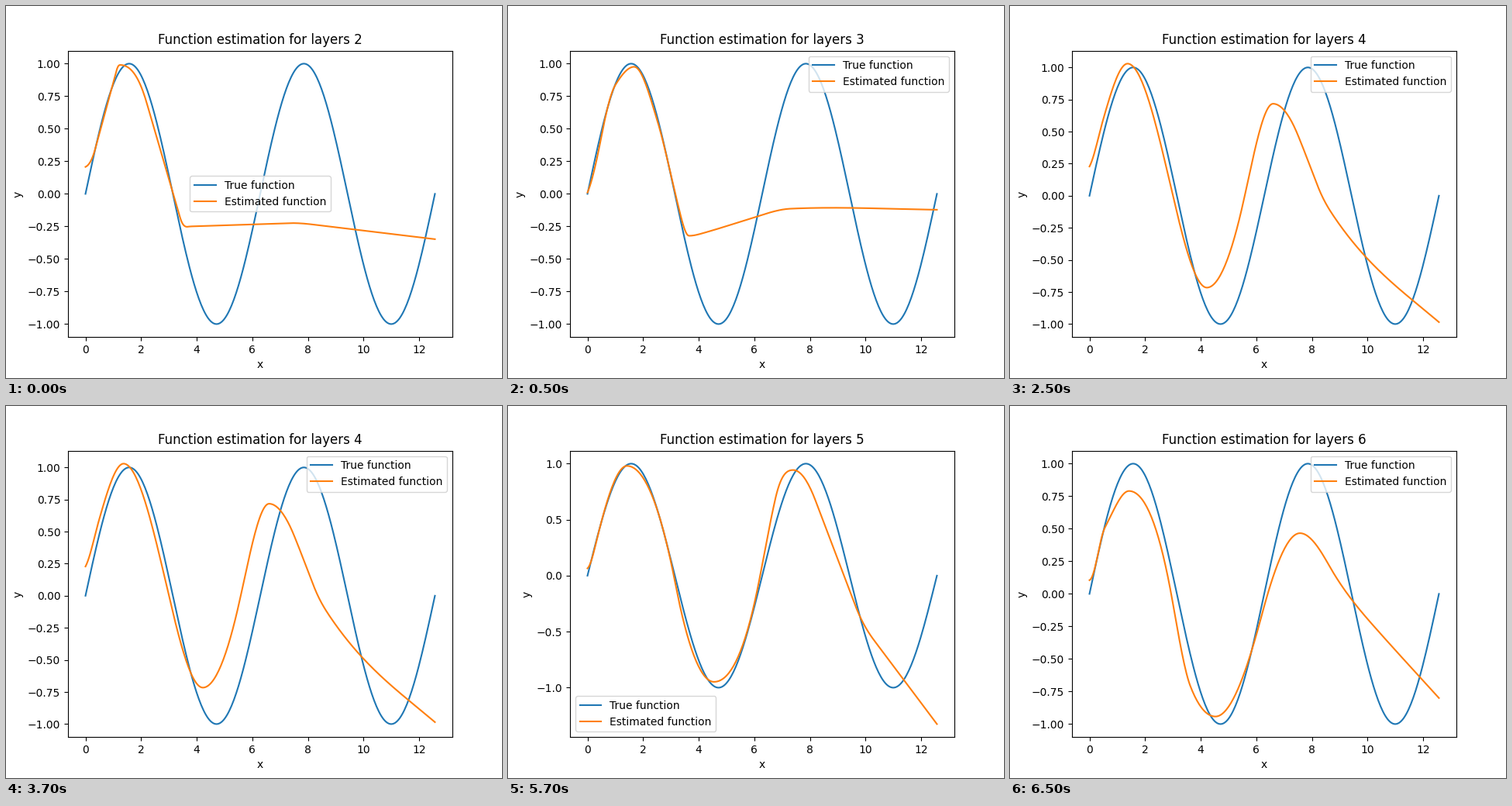
A matplotlib script that plays this animation: 640 px wide and 480 px high, repeating every 8000 ms.

```python
import numpy as np
import matplotlib.pyplot as plt
from matplotlib.animation import FuncAnimation

END = 4 * np.pi
X = np.linspace(0, END, 300)

# Key points (x, y, slope): peaks, steepest places and ends of straight runs.
TWO = [(0, .207, .1), (.35, .345, .78), (1.12, .95, .79), (1.24, .99, 0),
       (2.2, .7, -.733), (3.4, -.18, -.733), (3.78, -.25, .007),
       (7.3, -.225, .007), (8.2, -.236, -.026), (END, -.348, -.026)]
THREE = [(0, .01, .5), (.5, .44, 1.1), (1, .835, .35), (1.68, .976, 0),
         (2.5, .57, -.7), (3.33, -.15, -.85), (3.65, -.322, 0),
         (4.1, -.305, .06), (6.05, -.177, .067), (7.3, -.114, .01),
         (END, -.122, -.003)]
FOUR = [(0, .228, .4), (.5, .6, .75), (1.37, 1.0295, 0), (2.99, .01, -.93),
        (4.22, -.716, 0), (5.5, -.08, .95), (6.6, .717, 0), (7.5, .47, -.53),
        (8.2, .08, -.56), (8.8, -.165, -.32), (END, -.985, -.185)]
FIVE = [(0, .065, .2), (.37, .355, 1), (1.42, .98, 0), (3.15, -.06, -1.28),
        (4.55, -.948, 0), (6.2, -.01, 1.3), (6.75, .68, 1.1), (7.4, .943, 0),
        (8.2, .67, -.655), (9.6, -.247, -.655), (10.3, -.575, -.332),
        (END, -1.325, -.332)]
SIX = [(0, .105, .05), (.4, .4, 1), (.58, .52, .4), (1.42, .79, 0),
       (2.98, -.05, -1.2), (3.63, -.71, -.55), (4.53, -.942, 0), (6.2, -.16, .8),
       (7.57, .466, 0), (8.57, .235, -.38), (10.4, -.29, -.24), (END, -.8, -.235)]

# layers, key points, legend position, duration in half seconds
SCENES = [(2, TWO, "center", 1), (3, THREE, "upper right", 4),
          (4, FOUR, "upper right", 4), (5, FIVE, "lower left", 4),
          (6, SIX, "upper right", 3)]
TIMELINE = [scene for scene in SCENES for _ in range(scene[3])]


def hermite(points):
    """Cubic curve over X with the given heights and slopes."""
    px, py, slope = np.array(points).T
    i = np.clip(np.searchsorted(px, X, side="right") - 1, 0, len(px) - 2)
    h = px[i + 1] - px[i]
    t = (X - px[i]) / h
    return (py[i] * (1 + 2 * t) * (1 - t) ** 2 + py[i + 1] * t * t * (3 - 2 * t)
            + h * t * (1 - t) * (slope[i] * (1 - t) - slope[i + 1] * t))


fig, ax = plt.subplots(figsize=(6.4, 4.8), dpi=100)


def draw(frame):
    layers, points, loc, _ = TIMELINE[frame]
    ax.clear()
    ax.plot(X, np.sin(X), label="True function")
    ax.plot(X, hermite(points), label="Estimated function")
    ax.set(title=f"Function estimation for layers {layers}", xlabel="x", ylabel="y")
    ax.legend(loc=loc)


anim = FuncAnimation(fig, draw, frames=len(TIMELINE), interval=500,
                     init_func=lambda: draw(0), repeat=True, repeat_delay=0)
plt.show()
```
